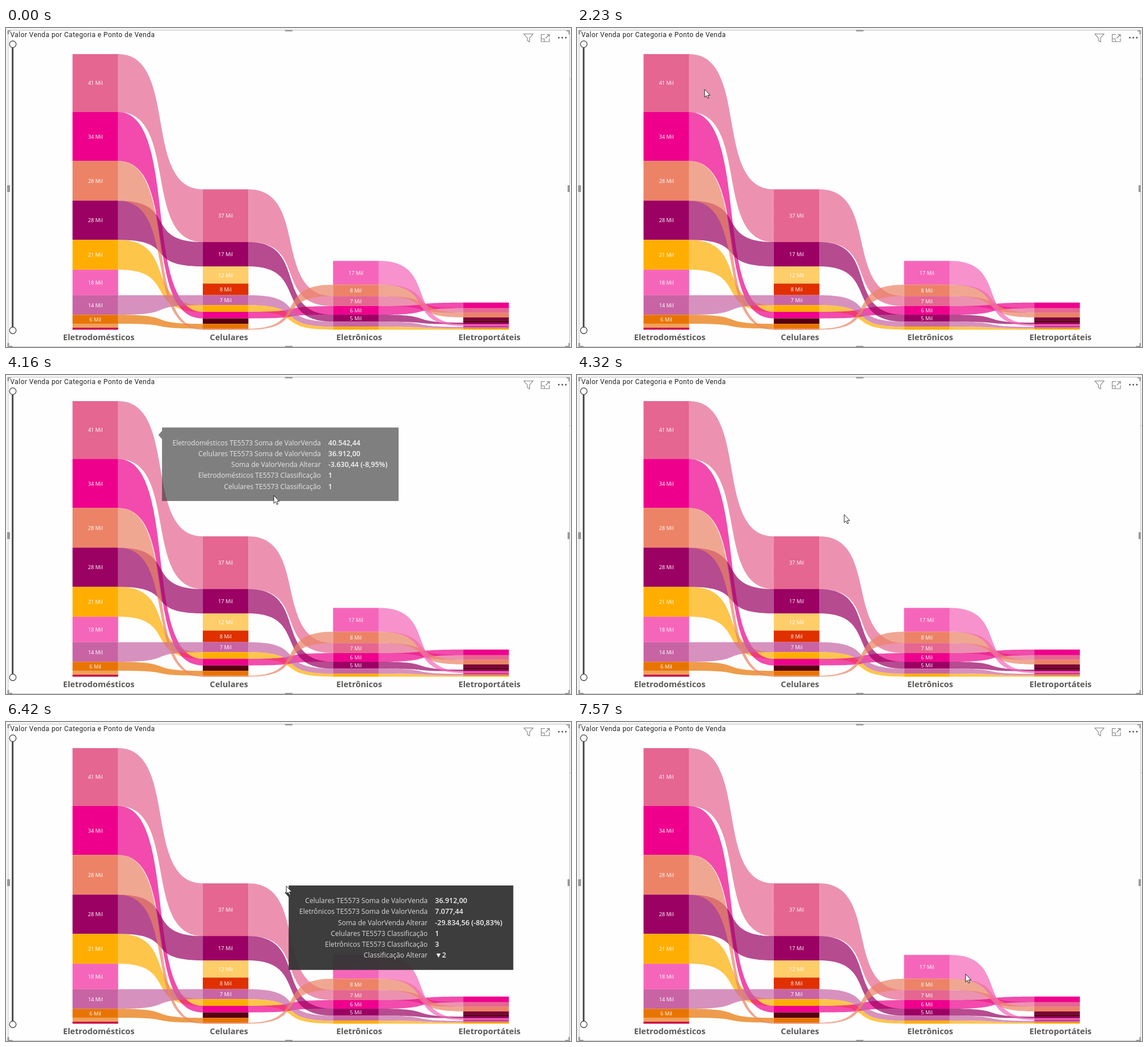
Animation, 996 px wide and 562 px high, one loop 7990 ms. Source, as an HTML page:

```html
<!DOCTYPE html>
<html lang="pt">
<head>
<meta charset="utf-8">
<title>Valor Venda</title>
<style>
html, body { margin: 0; width: 100%; height: 100%; overflow: hidden; background: #fefefe; }
svg { display: block; width: 996px; height: 562px; font-family: "Open Sans", "Noto Sans", sans-serif; }
.title { font: 12px Roboto, sans-serif; letter-spacing: .44px; fill: #252423; }
.mark { font-size: 9.3px; fill: #fff; text-anchor: middle; }
.axis { font-size: 14.6px; font-weight: 700; fill: #5b5957; text-anchor: middle; }
.label { font-size: 12.1px; fill: #d9d9d9; text-anchor: end; }
.value { font-size: 12.5px; font-weight: 600; fill: #f3f3f3; }
.icon { fill: none; stroke: #808080; stroke-width: 1.1; }
.knob { fill: #fff; stroke: #444; stroke-width: 1.3; }
</style>
</head>
<body>
<svg viewBox="0 0 996 562">
  <rect width="996" height="562" fill="#f4f4f4"/>
  <rect x="4" y="4" width="989.5" height="557.5" fill="#fefefe" stroke="#c4c4c4"/>
  <path d="M994 89.5H996" stroke="#bbb"/>
  <g fill="#999">
    <path d="M492 3.5h13V6h-13z M492 560h13v2h-13z M2 277h5v12H2z M990 277h4v12h-4z"/>
    <path d="M2.5 4h6v2h-3v5h-3z M994 4h-6v2h3.5v5h2.5z M2.5 562v-7h3v5h6v2z M994 562v-7h-2.5v5h-6v2z"/>
  </g>
  <text class="title" x="7.5" y="16">Valor Venda por Categoria e Ponto de Venda</text>
  <path class="icon" d="M913 10.5H929L923 17.5V24.5L919 22V17.5Z"/>
  <path class="icon" d="M950 11.5H943.5V24H958V18 M953 11.5H958V16 M958 11.5L951.5 18 M943.5 19H949V24"/>
  <path d="M974.5 17H988" stroke="#555" stroke-width="3" stroke-linecap="round" stroke-dasharray="0 6.2"/>
  <path d="M11.7 28V533" stroke="#484848" stroke-width="3"/>
  <circle class="knob" cx="12" cy="28.5" r="5.8"/>
  <circle class="knob" cx="12" cy="532.7" r="5.8"/>
  <g id="ribbons"></g>
  <g id="nodes"></g>
  <g id="tips"></g>
  <path id="cursor" d="M0 0V14L3.2 11.2L5.4 16L7.5 15.1L5.4 10.4H9.7Z" fill="#fff" stroke="#111" stroke-width=".9"/>
</svg>
<script>
const $ = id => document.getElementById(id);

function add(parent, tag, attrs, text) {
  const el = document.createElementNS('http://www.w3.org/2000/svg', tag);
  for (const k in attrs) el.setAttribute(k, attrs[k]);
  if (text) el.textContent = text;
  parent.appendChild(el);
  return el;
}

// Key order is also the stacking order of the ribbons.
const colors = {
  rose: '#e56690', yellow: '#ffae00', magenta: '#ee008c', purple: '#9b0063',
  mauve: '#c864a4', orange: '#e87400', salmon: '#ec8366', pink: '#f566ba',
  tan: '#f0a05a', crimson: '#c8004b', cream: '#ffcd69', red: '#e03000',
  wine: '#560010', plum: '#7a0038'
};

// Sales in thousands, largest first; every height and label follows from them.
const sales = {
  'Eletrodomésticos': { rose: 40.54, magenta: 34.3, salmon: 27.8, purple: 27.5, yellow: 20.9,
    pink: 17.9, mauve: 13.7, orange: 6.2, tan: 2.8, crimson: 1.4 },
  'Celulares': { rose: 36.91, purple: 17.1, cream: 12, red: 8.1, mauve: 7, yellow: 4.7,
    magenta: 4.6, wine: 3.8, orange: 3.4, salmon: .7 },
  'Eletrônicos': { pink: 16.7, salmon: 7.9, rose: 7.08, magenta: 6, purple: 4.9, mauve: 3.5, yellow: 2.1 },
  'Eletroportáteis': { magenta: 4, rose: 3.2, salmon: 3.2, plum: 2.4, wine: 1.2, purple: 1.2,
    pink: 1.2, crimson: .6, mauve: 1, yellow: 1 }
};
const base = 531.5, scale = 2.515, nodeW = 80.4, minLabel = 4.8;
const colX = i => 117.3 + 229.6 * i;

const spans = Object.entries(sales).map(([name, items], i) => {
  const x = colX(i), mid = x + nodeW / 2, span = {};
  let y = base - scale * Object.values(items).reduce((a, b) => a + b);
  for (const key in items) {
    const height = items[key] * scale;
    add($('nodes'), 'rect', { x, y, width: nodeW, height, fill: colors[key] });
    if (items[key] > minLabel) {
      add($('nodes'), 'text', { class: 'mark', x: mid, y: y + height / 2 + 3.5 }, Math.round(items[key]) + ' Mil');
    }
    span[key] = [y, y += height];
  }
  add($('nodes'), 'text', { class: 'axis', x: mid + 6, y: 550 }, name);
  return span;
});

const pull = .72;
for (const key in colors) {
  for (let i = 0; i < spans.length - 1; i++) {
    const a = spans[i][key], b = spans[i + 1][key];
    if (!a || !b) continue;
    const x0 = colX(i) + nodeW, x1 = colX(i + 1);
    const c0 = x0 + (x1 - x0) * pull, c1 = x1 - (x1 - x0) * pull;
    add($('ribbons'), 'path', {
      d: `M${x0} ${a[0]}C${c0} ${a[0]} ${c1} ${b[0]} ${x1} ${b[0]}V${b[1]}C${c1} ${b[1]} ${c0} ${a[1]} ${x0} ${a[1]}Z`,
      fill: colors[key], 'fill-opacity': .7
    });
  }
}

function tooltip(width, split, rows) {
  const g = add($('tips'), 'g', {});
  const h = 33.5 + 19.2 * rows.length;
  add(g, 'path', { d: `M0 0H${width}V${h}H0V20.5L-6.5 13L0 6Z`, fill: '#333', 'fill-opacity': .95 });
  rows.forEach(([label, value], i) => {
    const y = 31.2 + 19.2 * i;
    add(g, 'text', { class: 'label', x: split, y }, label);
    add(g, 'text', { class: 'value', x: split + 13, y }, value);
  });
  return g;
}

const shop = 'TE5573', sum = ' Soma de ValorVenda', rank = ' Classificação';
const tips = [
  { show: 2660, leave: 3700, fade: 4080, gone: 4315, el: tooltip(417, 280, [
    [`Eletrodomésticos ${shop}${sum}`, '40.542,44'],
    [`Celulares ${shop}${sum}`, '36.912,00'],
    ['Soma de ValorVenda Alterar', '-3.630,44 (-8,95%)'],
    [`Eletrodomésticos ${shop}${rank}`, '1'],
    [`Celulares ${shop}${rank}`, '1']
  ]) },
  { show: 5340, leave: 6370, fade: 6830, gone: 7140, el: tooltip(396, 245, [
    [`Celulares ${shop}${sum}`, '36.912,00'],
    [`Eletrônicos ${shop}${sum}`, '7.077,44'],
    ['Soma de ValorVenda Alterar', '-29.834,56 (-80,83%)'],
    [`Celulares ${shop}${rank}`, '1'],
    [`Eletrônicos ${shop}${rank}`, '3'],
    ['Classificação Alterar', '▼2']
  ]) }
];

// Each move is a Bézier from where the last one ended, walked in equal steps.
const entry = [480, -10];
const moves = [
  { from: 1240, to: 1980, steps: 10, path: [[440, 40], [330, 80], [267, 91]] },
  { from: 2060, to: 2230, steps: 3, path: [[250, 94], [235, 103], [225, 108]] },
  { from: 3570, to: 4320, steps: 10, path: [[235, 89], [538, 200], [471, 246]] },
  { from: 4410, to: 4900, steps: 7, path: [[470, 270], [466, 300], [455, 315]] },
  { from: 6250, to: 6980, steps: 10, path: [[477, 292], [587, 238], [620, 262]] },
  { from: 7060, to: 7570, steps: 7, path: [[645, 310], [670, 410], [685, 444]] }
];

const bezier = (u, a, b, c, d) => [0, 1].map(k => {
  const v = 1 - u;
  return v * v * v * a[k] + 3 * v * v * u * b[k] + 3 * v * u * u * c[k] + u * u * u * d[k];
});

// Pointer place at time t; lag is counted in steps.
function pointer(t, lag = 0) {
  let pos = entry;
  for (const { from, to, steps, path } of moves) {
    if (t < from) break;
    const step = Math.floor((t - from) / (to - from) * (steps - 1) + .01) + 1;
    if (step < steps) return bezier((step - lag) / steps, pos, ...path);
    pos = path[2];
  }
  return pos;
}

function place(el, [x, y], opacity) {
  el.setAttribute('transform', `translate(${x} ${y})`);
  el.setAttribute('opacity', opacity);
}

const start = performance.now();
function draw(now) {
  const t = Math.max(0, now - start) % 7990;
  place($('cursor'), pointer(t), t < moves[0].from ? 0 : 1);
  for (const { el, show, leave, fade, gone } of tips) {
    const [x, y] = pointer(Math.min(t, leave), .5);
    const left = Math.min(1, Math.max(0, (gone - t) / (gone - fade)));
    place(el, [x + 28, y - 15], t < show ? 0 : left);
  }
  requestAnimationFrame(draw);
}
draw(start);
</script>
</body>
</html>
```
